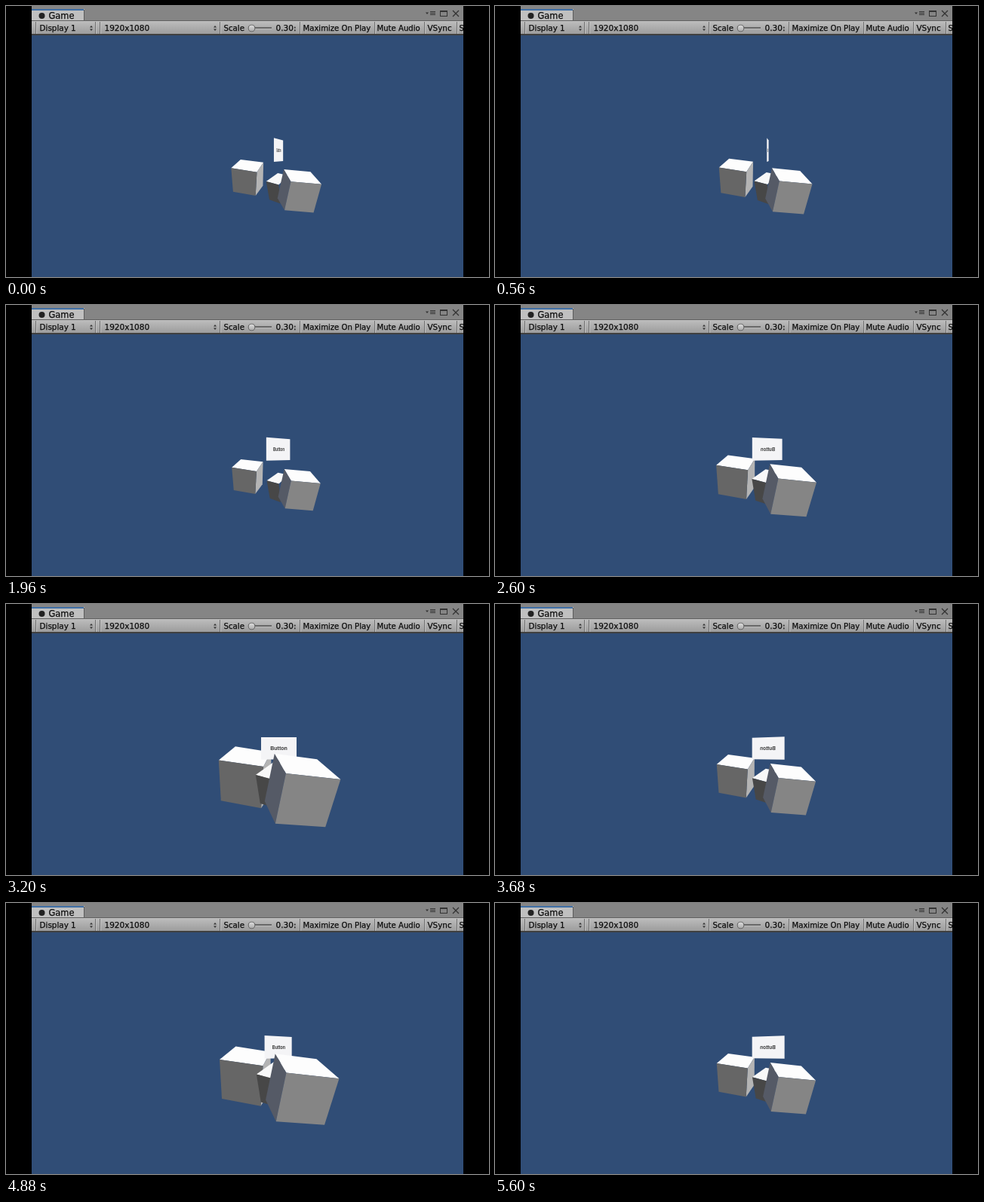
Write an HTML page with a canvas that moves like this. It is 640x360 px and loops after 5640 ms.

```html
<!DOCTYPE html>
<html lang="en">
<head>
<meta charset="utf-8">
<title>Game view</title>
<style>
html, body { margin: 0; width: 100%; height: 100%; overflow: hidden; background: #000; }
canvas { display: block; width: 640px; height: 360px; }
</style>
</head>
<body>
<canvas id="stage" width="640" height="360"></canvas>
<script>
const ctx = document.getElementById('stage').getContext('2d');
const LOOP = 5640, STEP = 40;
const PULSE = 1.92, TURN = 0.96;
const UI_FONT = '"DejaVu Sans", Verdana, sans-serif';

// Corners as [x, y] at the smallest size, then at the largest.
const cubes = {
  left: {
    a: [301, 216.5, 282, 207.5], b: [312, 206.5, 304, 189.5],
    c: [339.5, 209.5, 351, 197], d: [331, 221.5, 341, 216],
    e: [303.5, 244.5, 285, 261], f: [329.5, 249, 338, 271],
    g: [338.5, 237, 352, 249],
    faces: [['abcd', '#fdfdfd'], ['dcgf', '#b4b4b4'], ['adfe', '#666666']]
  },
  back: {
    a: [347, 234, 331, 227], b: [361, 224, 355, 210],
    c: [374, 227, 376, 214], d: [362, 238, 357, 234],
    e: [351, 256, 337, 265], f: [364, 261, 361, 272],
    faces: [['abcd', '#f8f8f8'], ['adfe', '#474747']]
  },
  front: {
    a: [370, 220, 356, 199], b: [402, 222.5, 412, 206.5],
    c: [414, 237.5, 443, 233], d: [378.5, 234.5, 371, 225],
    e: [405, 271, 423, 296], f: [371, 268, 357, 291.5],
    g: [362.5, 254, 343, 262],
    faces: [['abcd', '#fdfdfd'], ['adfg', '#555a66'], ['dcef', '#858585']]
  }
};

// Panel heading in degrees through one turn: [seconds, angle].
const turnKeys = [[0, 75], [0.04, 48], [0.08, 40], [0.32, 0], [0.36, -12], [0.8, -204], [TURN, -285]];

function rect(x, y, w, h, color) {
  ctx.fillStyle = color;
  ctx.fillRect(x, y, w, h);
}

function poly(points, color) {
  ctx.beginPath();
  points.forEach(([x, y]) => ctx.lineTo(x, y));
  ctx.closePath();
  ctx.fillStyle = color;
  ctx.fill();
}

function stroke(points, color, width = 1) {
  ctx.beginPath();
  points.forEach(([x, y], i) => i % 2 ? ctx.lineTo(x, y) : ctx.moveTo(x, y));
  ctx.strokeStyle = color;
  ctx.lineWidth = width;
  ctx.stroke();
}

function disc(x, y, r, color) {
  ctx.beginPath();
  ctx.arc(x, y, r, 0, Math.PI * 2);
  ctx.fillStyle = color;
  ctx.fill();
}

function label(text, x, y, size = 10) {
  ctx.font = `${size}px ${UI_FONT}`;
  ctx.fillStyle = ctx.strokeStyle = '#0c0c0c';
  ctx.lineWidth = 0.25;
  ctx.fillText(text, x, y);
  ctx.strokeText(text, x, y);
}

function vertical(y0, y1, from, to) {
  const g = ctx.createLinearGradient(0, y0, 0, y1);
  g.addColorStop(0, from);
  g.addColorStop(1, to);
  return g;
}

function drawCube(cube, size) {
  const at = key => {
    const [x0, y0, x1, y1] = cube[key];
    return [x0 + (x1 - x0) * size, y0 + (y1 - y0) * size];
  };
  for (const [corners, color] of cube.faces) poly([...corners].map(at), color);
}

// Monotone curve through the heading keys.
function heading(s) {
  const k = turnKeys, n = k.length - 1;
  const slope = i => {
    const j = (i + n) % n;
    return (k[j + 1][1] - k[j][1]) / (k[j + 1][0] - k[j][0]);
  };
  const tangent = i => 2 / (1 / slope(i - 1) + 1 / slope(i));
  let i = 0;
  while (i < n - 1 && s >= k[i + 1][0]) i++;
  const [t0, v0] = k[i], [t1, v1] = k[i + 1];
  const h = t1 - t0, u = (s - t0) / h;
  const blend = u * u * (3 - 2 * u);
  return v0 + (v1 - v0) * blend
    + h * u * (1 - u) * ((1 - u) * tangent(i) - u * tangent(i + 1));
}

// The panel turns about its upright axis, seen from slightly below its middle.
function drawPanel(degrees) {
  const angle = degrees * Math.PI / 180;
  const c = Math.cos(angle), s = Math.sin(angle);
  const cx = 361.5, cy = 191.7, horizon = 199;
  const corner = (side, up) => {
    const near = 1 / (1 + 0.075 * s * side);
    return [cx + 23.5 * side * c * near, horizon + (cy + 14.7 * up - horizon) * near];
  };
  poly([corner(-1, -1), corner(1, -1), corner(1, 1), corner(-1, 1)], '#f4f4f6');
  ctx.save();
  ctx.transform(c, 0, 0, 1, cx, cy);
  ctx.font = 'bold 7px "Liberation Sans", Arial, sans-serif';
  ctx.textAlign = 'center';
  ctx.fillStyle = '#333';
  ctx.fillText('Button', 0, 2.4);
  ctx.restore();
}

function popupArrows(x) {
  poly([[x - 2, 28.5], [x, 26], [x + 2, 28.5]], '#333');
  poly([[x - 2, 30.5], [x, 33], [x + 2, 30.5]], '#333');
}

function drawWindow() {
  rect(0, 0, 640, 360, '#000');
  rect(34, 0, 572, 20, '#858585');

  rect(34, 4, 70, 16, '#c0c0c0');
  rect(34, 4, 69, 2, '#3f6fa6');
  rect(103, 5, 1, 15, '#5c5c5c');
  disc(47.5, 13, 4, '#222');
  label('Game', 56.5, 17, 11.4);

  poly([[556, 8.5], [560, 8.5], [558, 11]], '#333');
  for (const y of [7, 9, 11]) rect(562, y, 7, 1, '#333');
  ctx.strokeStyle = '#333';
  ctx.lineWidth = 1;
  ctx.strokeRect(575.5, 6.5, 9, 7);
  rect(575, 6, 10, 2, '#333');
  stroke([[592, 6], [600, 14], [600, 6], [592, 14]], '#333', 1.3);

  rect(34, 20, 572, 18, vertical(20, 38, '#bdbdbd', '#9b9b9b'));
  rect(34, 19, 572, 1, '#606060');
  rect(34, 37, 572, 2, '#404040');
  for (const x of [39, 118, 124, 283, 389, 488, 554, 597]) {
    rect(x, 21, 1, 16, '#707070');
    rect(x + 1, 21, 1, 16, '#c2c2c2');
  }

  ctx.save();
  ctx.beginPath();
  ctx.rect(34, 0, 572, 39);
  ctx.clip();
  label('Display 1', 44.5, 33, 10.4);
  label('1920x1080', 130.5, 33, 10.5);
  label('Scale', 288.5, 33, 10.2);
  label('0.30:', 357.5, 33, 10.5);
  label('Maximize On Play', 393.5, 33, 10.1);
  label('Mute Audio', 491.5, 33, 10.1);
  label('VSync', 558.5, 33, 10.4);
  label('S', 600.5, 33);
  ctx.restore();

  popupArrows(113);
  popupArrows(277);
  rect(326, 28, 26, 3, '#686868');
  rect(327, 30, 25, 1, '#bcbcbc');
  disc(325.5, 29.5, 4.8, '#555');
  disc(325.5, 29.5, 3.9, vertical(25, 34, '#e0e0e0', '#a8a8a8'));

  rect(34, 39, 572, 321, '#304d76');
}

function draw(ms) {
  const t = Math.floor(ms % LOOP / STEP) * STEP / 1000;
  const size = 0.5 - 0.525 * Math.cos((t - 0.25) / PULSE * Math.PI * 2);
  drawWindow();
  drawCube(cubes.left, size);
  drawPanel(heading(t % TURN));
  drawCube(cubes.back, size);
  drawCube(cubes.front, size);
}

let start;
function tick(now) {
  start ??= now;
  draw(Math.max(0, now - start));
  requestAnimationFrame(tick);
}
draw(0);
requestAnimationFrame(tick);
</script>
</body>
</html>
```
